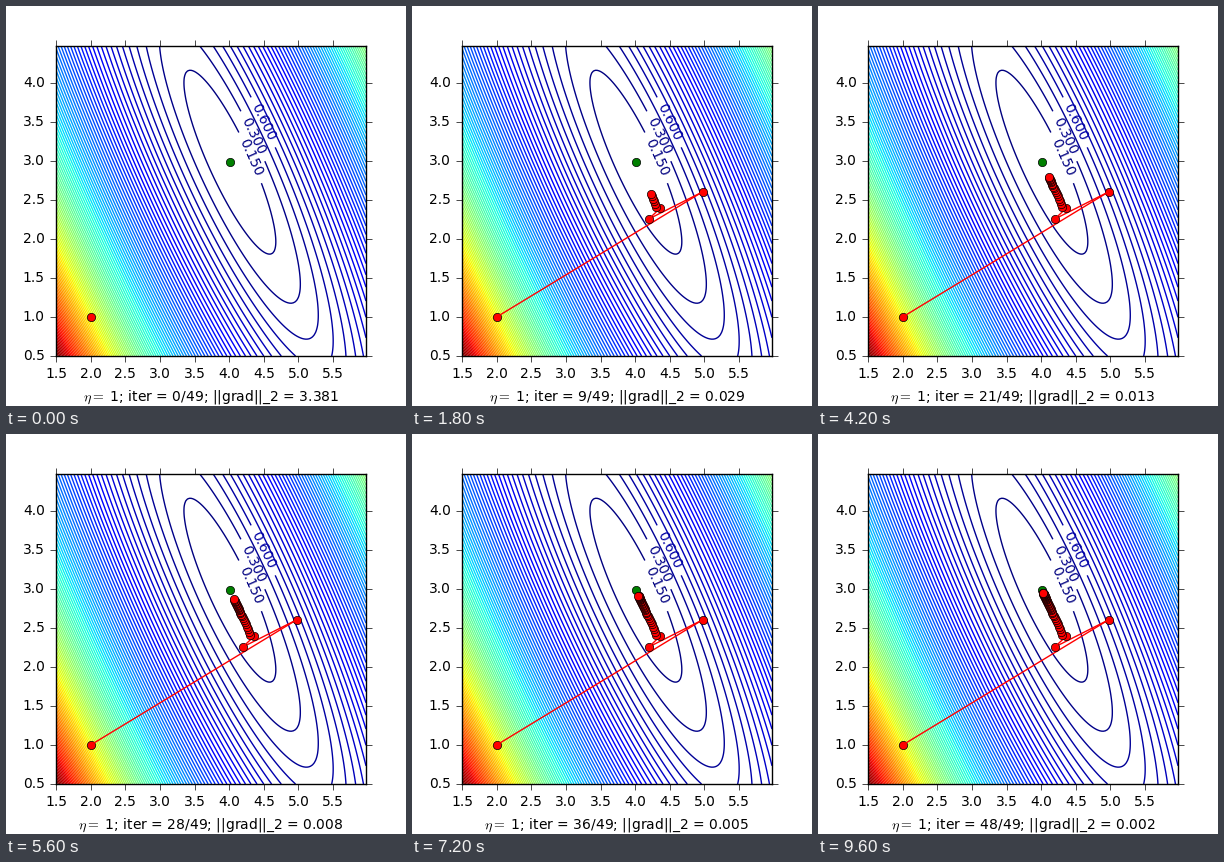
Recreate the animation shown at these times as a matplotlib script. Size 400x400 px, loop 9.8 s.

```python
import numpy as np
import matplotlib.pyplot as plt
from matplotlib.animation import FuncAnimation

plt.style.use("classic")
plt.rcParams.update({
    "font.family": "DejaVu Sans",
    "font.size": 10,
    "figure.facecolor": "white",
    "xtick.direction": "out",
    "ytick.direction": "out",
})

STEPS = 49
ETA = 1

# Least-squares cost: (w - best)' A (w - best) + noise
A = np.array([[1.0, 0.4864], [0.4864, 0.3164]])
best = np.array([4.010, 2.985])
noise = 0.039


def gradient(w):
    return A @ (w - best)


def descend(w, count):
    path = [np.array(w, dtype=float)]
    while len(path) < count:
        path.append(path[-1] - ETA * gradient(path[-1]))
    return np.array(path)


path = descend((2, 1), STEPS)
norms = [np.linalg.norm(gradient(w)) for w in path]

fig = plt.figure(figsize=(4, 4), dpi=100)
ax = fig.add_axes([0.125, 0.125, 0.775, 0.775])

# Cost surface as contour lines
delta = 0.025
xs = np.arange(1.5, 6.0 - delta / 2, delta)
ys = np.arange(0.5, 4.5 - delta / 2, delta)
X, Y = np.meshgrid(xs, ys)
dx, dy = X - best[0], Y - best[1]
Z = A[0, 0] * dx**2 + 2 * A[0, 1] * dx * dy + A[1, 1] * dy**2 + noise
levels = np.arange(0.15, Z.max(), 0.15)
contours = ax.contour(X, Y, Z, levels, cmap="jet", linewidths=1)

ax.set_xlim(xs[0], xs[-1])
ax.set_ylim(ys[0], ys[-1])
ax.set_xticks(np.arange(1.5, 5.9, 0.5))
ax.set_yticks(np.arange(0.5, 4.4, 0.5))
ax.clabel(contours, fmt="%1.3f", fontsize=10, inline=True, inline_spacing=8,
          manual=[(4.5, 3.5), (4.2, 3.0), (4.3, 3.3)])


def dot(point, color):
    return ax.plot(*point, "o", color=color, ms=6, mec="black", mew=0.5)


dot(best, "green")

# Each step owns a segment from the previous point and a dot
steps = []
for k, point in enumerate(path):
    segment = ax.plot(*path[k - 1:k + 1].T, "-", color="red", lw=1) if k else []
    steps.append(segment + dot(point, "red"))

label = ax.set_xlabel("")


def update(i):
    for k, artists in enumerate(steps):
        for artist in artists:
            artist.set_visible(k <= i)
    label.set_text(rf"$\eta =$ {ETA}; iter = {i}/{STEPS}; "
                   f"||grad||_2 = {norms[i]:.3f}")
    return [label]


anim = FuncAnimation(fig, update, frames=STEPS, interval=200,
                     repeat=True, repeat_delay=0, blit=False)
plt.show()
```
